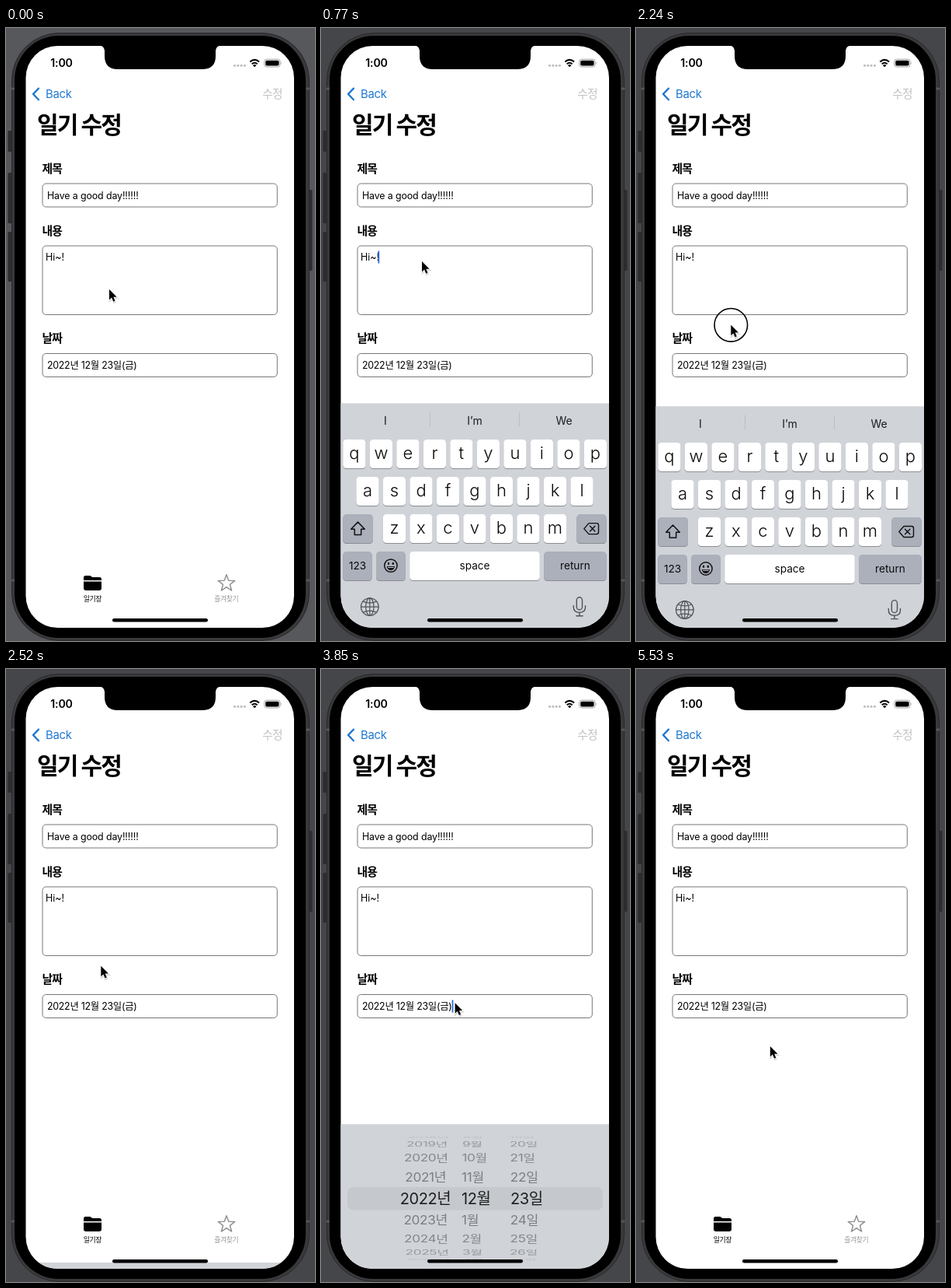
Write an HTML page that moves like this. It is 398 px wide and 788 px high and loops after 5.6 s.

```html
<!DOCTYPE html>
<html lang="ko">
<head>
<meta charset="utf-8">
<title>Diary editor</title>
<style>
html, body { margin: 0; width: 100%; height: 100%; overflow: hidden; background: #57585c; }
svg { display: block; width: 398px; height: 788px; }
text { font-family: Inter, "Noto Sans CJK KR", sans-serif; white-space: pre; }
</style>
</head>
<body>
<svg id="stage" viewBox="0 0 398 788" xmlns="http://www.w3.org/2000/svg">
  <defs>
    <clipPath id="screen"><rect x="25.5" y="23" width="345.5" height="748" rx="41"/></clipPath>
  </defs>
  <rect width="398" height="788" fill="#5a5b5f"/>
  <rect id="shade" width="398" height="788" fill="#000"/>
  <g id="buttons" fill="#2d2d30"></g>
  <rect x="7.5" y="6.5" width="383" height="781" rx="61" fill="#39393c" stroke="#29292b"/>
  <g id="bands" stroke="#55565a" stroke-width="3"></g>
  <rect x="11" y="10" width="375" height="774" rx="57"/>
  <g clip-path="url(#screen)">
    <rect x="25" y="22" width="347" height="750" fill="#fff"/>
    <g id="page"></g>
    <g id="carets" fill="#2c6bd6">
      <rect id="noteCaret" x="73.4" y="286.5" width="1.8" height="16"/>
      <rect id="dateCaret" x="168.6" y="425.5" width="1.8" height="16"/>
    </g>
    <g id="keyboard"></g>
    <g id="picker"></g>
    <rect x="137" y="759" width="123" height="4.4" rx="2.2"/>
  </g>
  <path d="M119 22Q126.500 23 127 29V36Q127 53 144 53H253Q270 53 270 36V29Q270.500 23 278 22Z"/>
  <circle id="touch" r="21.3" fill="none" stroke="#000" stroke-width="1.6"/>
  <g id="pointer">
    <path d="M0 0V13.500L3.100 10.600L5.300 15.700L7.500 14.700L5.400 9.800H9.700Z" transform="translate(.4 1.300)" fill="#000" opacity=".18" stroke="#000" stroke-width="2"/>
    <path d="M0 0V13.500L3.100 10.600L5.300 15.700L7.500 14.700L5.400 9.800H9.700Z" stroke="#fff" stroke-width="1.8" paint-order="stroke"/>
  </g>
</svg>
<script>
const NS = 'http://www.w3.org/2000/svg';
const $ = id => document.getElementById(id);

function add(parent, tag, attrs, content) {
  const el = document.createElementNS(NS, tag);
  for (const key in attrs) el.setAttribute(key, attrs[key]);
  if (content !== undefined) el.textContent = content;
  parent.appendChild(el);
  return el;
}

function label(parent, str, x, y, size, opts = {}) {
  return add(parent, 'text', { x, y, 'font-size': size, ...opts }, str);
}

function line(parent, d, color, width) {
  return add(parent, 'path', {
    d, fill: 'none', stroke: color, 'stroke-width': width,
    'stroke-linecap': 'round', 'stroke-linejoin': 'round'
  });
}

function buildFrame() {
  for (const [x, y, h] of [[2.5, 132, 27], [2.5, 186, 65], [2.5, 262, 64], [389, 208, 104]]) {
    add($('buttons'), 'rect', { x, y, width: 5.5, height: h, rx: 1.5 });
  }
  for (const y of [78, 710]) line($('bands'), `M8 ${y}h2M388 ${y}h2`, '#55565a', 3);
}

function buildPage() {
  const p = $('page');
  const bold = { 'font-weight': 600, 'letter-spacing': -0.9 };

  label(p, '1:00', 57.3, 50.3, 14.2, { 'font-weight': 600, 'letter-spacing': -0.2 });
  for (let i = 0; i < 4; i++) add(p, 'circle', { cx: 294.5 + i * 4.3, cy: 48.3, r: 1.5, fill: '#bcbcbe' });
  line(p, 'M314.300 43.600Q320.200 38.200 326.100 43.600M316.700 46.300Q320.200 43.200 323.700 46.300', '#000', 2).setAttribute('stroke-linecap', 'butt');
  add(p, 'path', { d: 'M317.900 47.900Q320.200 46 322.500 47.900L320.200 50.300Z' });
  add(p, 'rect', { x: 332.7, y: 40.2, width: 20.4, height: 9.8, rx: 3, fill: 'none', stroke: '#a3a3a5' });
  add(p, 'rect', { x: 334.2, y: 41.7, width: 17.4, height: 6.8, rx: 1.7 });
  add(p, 'path', { d: 'M354.200 43.500q1.700 1.600 0 3.300z', fill: '#a3a3a5' });

  line(p, 'M42 77.600L35 84.900L42 92.200', '#2079d0', 2.3);
  label(p, 'Back', 51, 90, 14.9, { fill: '#2079d0', 'letter-spacing': -0.3 });
  label(p, '수정', 356, 90, 14.8, { fill: '#c2c2c4', 'text-anchor': 'end', 'letter-spacing': -0.7 });
  label(p, '일기 수정', 40, 135.3, 30, { 'font-weight': 700, 'letter-spacing': -1.9 });

  label(p, '제목', 46.5, 185.7, 14.8, bold);
  label(p, '내용', 46.5, 265.5, 14.8, bold);
  label(p, '날짜', 46.5, 403.7, 14.8, bold);
  for (const [y, h] of [[200, 30], [280, 88.5], [418.5, 30]]) {
    add(p, 'rect', { x: 47, y, width: 302.3, height: h, rx: 4.5, fill: 'none', stroke: '#77777a', 'stroke-width': 1 });
  }
  label(p, 'Have a good day!!!!!!', 53, 219.6, 12.4, { 'letter-spacing': -0.12 });
  label(p, 'Hi~!', 51, 298.8, 12.4);
  label(p, '2022년 12월 23일(금)', 53, 437.8, 12.4, { 'letter-spacing': -0.27 });

  add(p, 'path', { d: 'M100 710V706.500Q100 704 102.500 704H107.500Q109 704 110 705L111 706H120.500Q123 706 123 708.500V710Z' });
  add(p, 'path', { d: 'M100 711.400H123V720Q123 723 120 723H103Q100 723 100 720Z' });
  label(p, '일기장', 111.3, 737, 8.9, { 'text-anchor': 'middle', 'font-weight': 500, 'letter-spacing': -0.4 });
  const star = [];
  for (let i = 0; i < 10; i++) {
    const a = i * Math.PI / 5, r = i % 2 ? 4.7 : 11.2;
    star.push(`${(284 + r * Math.sin(a)).toFixed(2)} ${(714 - r * Math.cos(a)).toFixed(2)}`);
  }
  line(p, `M${star.join('L')}Z`, '#929295', 1.5);
  label(p, '즐겨찾기', 283.7, 737, 8.9, { 'text-anchor': 'middle', fill: '#99999c', 'letter-spacing': -0.4 });
}

function key(parent, x, y, w, text, size, special) {
  const box = { x, width: w, height: 37, rx: 4.3 };
  add(parent, 'rect', { ...box, y: y + 1, fill: '#8b8d92' });
  add(parent, 'rect', { ...box, y, fill: special ? '#abb0bb' : '#fff' });
  if (!text) return;
  const big = size > 20;
  label(parent, text, x + w / 2, y + (big ? 25 : 23.3), size, {
    'text-anchor': 'middle', 'font-weight': big ? 300 : 400, fill: '#0a0a0a'
  });
}

function buildKeyboard() {
  const k = $('keyboard');
  add(k, 'rect', { x: 25, y: 473.3, width: 347, height: 300, fill: '#d0d3d8' });
  ['I', 'I’m', 'We'].forEach((word, i) =>
    label(k, word, 83 + i * 115, 501, 14, { 'text-anchor': 'middle', fill: '#1c1c1e' }));
  line(k, 'M140.500 485V503M255.500 485V503', '#bcc0c5', 1);

  [['qwertyuiop', 28.3, 520], ['asdfghjkl', 45.4, 568], ['zxcvbnm', 79.8, 616]].forEach(([row, x, y]) =>
    [...row].forEach((c, i) => key(k, x + i * 34.5, y, 29.2, c, 22)));
  key(k, 28.3, 616, 38.6, '', 0, true);
  key(k, 329.3, 616, 38.4, '', 0, true);
  key(k, 28.3, 664, 37.4, '123', 13.6, true);
  key(k, 71, 664, 37.8, '', 0, true);
  key(k, 114.2, 664, 167.6, 'space', 13.6);
  key(k, 287.2, 664, 80.5, 'return', 13.6, true);

  line(k, 'M47.500 626L56.300 635.200H51.700V642.300H43.300V635.200H38.700Z', '#111', 1.5);
  line(k, 'M345 627.500H355Q357.500 627.500 357.500 630V639Q357.500 641.500 355 641.500H345L338.800 634.500ZM346.500 631.200l6.400 6.600M352.900 631.200l-6.400 6.600', '#111', 1.4);

  add(k, 'circle', { cx: 89.9, cy: 682, r: 8.2, fill: 'none', stroke: '#111', 'stroke-width': 1.5 });
  for (const cx of [87, 92.8]) add(k, 'ellipse', { cx, cy: 679.3, rx: 1.2, ry: 1.7, fill: '#111' });
  add(k, 'path', { d: 'M84.700 683H95.100Q94.300 688 89.900 688T84.700 683Z', fill: '#111' });
  line(k, 'M86.500 684.300H93.300', '#d5d8dd', 1);

  const grey = '#505358';
  add(k, 'circle', { cx: 62.8, cy: 735, r: 11.3, fill: 'none', stroke: grey, 'stroke-width': 1.3 });
  add(k, 'ellipse', { cx: 62.8, cy: 735, rx: 5.2, ry: 11.3, fill: 'none', stroke: grey, 'stroke-width': 1.2 });
  line(k, 'M62.800 723.700V746.300M51.500 735H74.100M54.300 728Q62.800 732 71.300 728M54.300 742Q62.800 738 71.300 742', grey, 1.2);
  add(k, 'rect', { x: 329.3, y: 722.7, width: 7.2, height: 16, rx: 3.6, fill: 'none', stroke: grey, 'stroke-width': 1.4 });
  line(k, 'M325.300 733.500V735.500Q325.300 742.300 332.900 742.300T340.500 735.500V733.500M332.900 742.500V746.700M328.700 746.700H337.100', grey, 1.4);
}

function buildPicker() {
  const p = $('picker');
  add(p, 'rect', { x: 25, y: 579.3, width: 347, height: 194, fill: '#d0d3d8' });
  add(p, 'rect', { x: 34, y: 660, width: 329, height: 29.5, rx: 7, fill: '#c5c8cc' });
  const fade = [1, 0.47, 0.42, 0.32, 0.12];
  for (let i = -4; i <= 4; i++) {
    const a = i * 20.4 * Math.PI / 180, tilt = (1 - Math.cos(a)) * 4;
    const size = i ? 17.2 : 20;
    const row = add(p, 'g', {
      transform: `translate(0 ${674.7 + 79.5 * Math.sin(a)}) scale(1 ${Math.cos(a)})`,
      fill: '#1d1e20', opacity: fade[Math.abs(i)]
    });
    const y = size * 0.36, style = { 'letter-spacing': i ? -0.35 : -0.4 };
    label(row, `${2022 + i}년`, 134.5 + tilt, y, size, { ...style, 'text-anchor': 'middle' });
    label(row, `${(11 + i) % 12 + 1}월`, 181 + tilt / 2, y, size, style);
    label(row, `${23 + i}일`, 244 - tilt / 2, y, size, style);
  }
}

const LOOP = 5600, STEP = 70;
const clamp = v => Math.max(0, Math.min(1, v));
const within = (t, a, b) => t >= a && t < b;

// Critically damped spring from 0 to 1
function spring(t, start) {
  const x = Math.max(0, t - start) * 0.01826;
  return 1 - (1 + x) * Math.exp(-x);
}

const panel = (t, up, down) => t < down ? spring(t, up) : 1 - spring(t, down);

// Solid, then a short fade out and back in
function blink(t, start, end) {
  if (!within(t, start, end)) return 0;
  const p = (t - start) % 985;
  return p < 800 ? 1 - clamp((p - 595) / 100) : clamp((p - 885) / 100);
}

const route = [
  [0, 133, 336], [270, 130, 300], [1400, 130, 300], [2030, 122.3, 381.8], [2660, 122.3, 381.8],
  [3290, 172.6, 429.3], [4200, 172.6, 429.3], [4620, 168.6, 459.6], [5390, 168.6, 459.6],
  [5530, 172.8, 485], [5600, 172.8, 485]
];

function pointerAt(t) {
  const i = route.findIndex(stop => stop[0] > t);
  const [t0, x0, y0] = route[i - 1], [t1, x1, y1] = route[i];
  const p = (t - t0) / (t1 - t0), e = p * p * (3 - 2 * p);
  return [x0 + (x1 - x0) * e, y0 + (y1 - y0) * e];
}

const taps = [[280, 350], [2100, 2300], [3360, 3430], [4760, 4900]];

function draw(t) {
  const [x, y] = pointerAt(t);
  $('pointer').setAttribute('transform', `translate(${x} ${y})`);
  $('touch').setAttribute('cx', x);
  $('touch').setAttribute('cy', y);
  $('touch').setAttribute('visibility', taps.some(([a, b]) => within(t, a, b)) ? 'visible' : 'hidden');
  $('shade').setAttribute('opacity', 0.03 + 0.2 * clamp(t / 210));
  $('noteCaret').setAttribute('opacity', blink(t, 490, 2220));
  $('dateCaret').setAttribute('opacity', blink(t, 3570, 4880));
  $('keyboard').setAttribute('transform', `translate(0 ${298 * (1 - panel(t, 478, 2222))})`);
  $('picker').setAttribute('transform', `translate(0 ${192 * (1 - panel(t, 3558, 4880))})`);
}

buildFrame();
buildPage();
buildKeyboard();
buildPicker();

const begin = performance.now();
function tick() {
  const t = (performance.now() - begin) % LOOP;
  draw(Math.floor(t / STEP) * STEP);
  requestAnimationFrame(tick);
}
tick();
</script>
</body>
</html>
```
